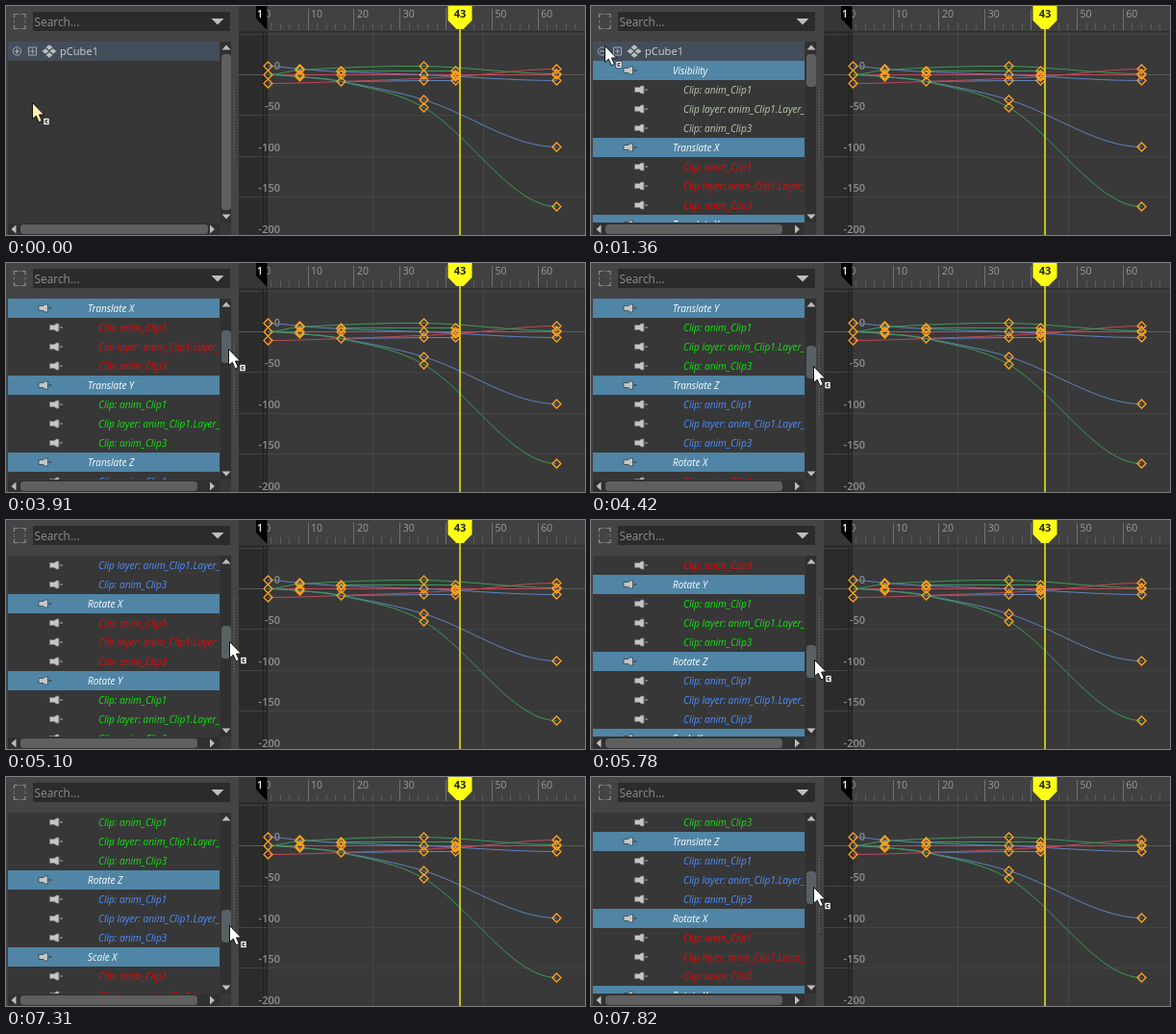
Write an HTML page that moves like this. It is 602 by 238 pixels and loops after 7.99 s.

```html
<!DOCTYPE html>
<html lang="en">
<head>
<meta charset="utf-8">
<title>Graph editor</title>
<style>
html, body { margin: 0; width: 100%; height: 100%; overflow: hidden; background: #444; }
svg { display: block; width: 602px; height: 238px; font-family: "Open Sans", "Noto Sans", sans-serif; }
text { white-space: pre; }
</style>
</head>
<body>
<svg viewBox="0 0 602 238">
  <defs>
    <clipPath id="view"><rect x="2" y="37" width="220" height="188"/></clipPath>
    <path id="horn" d="M-6.5-2.5h5l1.5-1.5h3v8h-3l-1.5-1.5h-5zM4.5-.5h2v1h-2z"/>
  </defs>
  <rect width="602" height="238" fill="#444"/>
  <g id="panel"></g>
  <g id="rows" clip-path="url(#view)"></g>
  <g id="bars"></g>
  <g id="graph"></g>
  <g id="cursor">
    <path id="arrow" d="M.5 .5V17.5L4.3 14.2 7.2 20.8 10.4 19.4 7.5 13H12.6Z" stroke="#111"/>
    <rect x="12" y="16.5" width="6" height="7" fill="#fff" stroke="#222" stroke-width=".6"/>
    <path d="M16.5 18.5h-2.5v3h2.5M14 20h2" fill="none" stroke="#222" stroke-width=".9"/>
  </g>
</svg>
<script>
const LOOP = 7990, STEP = 170, OPEN = 8, ROW = 20, TOP = 37;
const $ = id => document.getElementById(id);

const rect = (x, y, w, h, fill, rx = 0) =>
  `<rect x="${x}" y="${y}" width="${w}" height="${h}" fill="${fill}" rx="${rx}"/>`;
const line = (d, stroke, w = 1) =>
  `<path d="${d}" fill="none" stroke="${stroke}" stroke-width="${w}"/>`;
const shape = (d, fill) => `<path d="${d}" fill="${fill}"/>`;
const text = (x, y, s, fill, size, extra = "") =>
  `<text x="${x}" y="${y}" fill="${fill}" font-size="${size}" ${extra}>${s}</text>`;

// Outliner tree
const RGB = ["#e60a0a", "#0ee60e", "#4d90ff"];
const channels = [["Visibility", "#bccbb2"]];
for (const name of ["Translate", "Rotate", "Scale"])
  ["X", "Y", "Z"].forEach((axis, i) => channels.push([`${name} ${axis}`, RGB[i]]));
const clips = ["Clip: anim_Clip1", "Clip layer: anim_Clip1.Layer_", "Clip: anim_Clip3"];
const tree = [{ root: true }];
for (const [name, color] of channels)
  tree.push({ name }, ...clips.map(clip => ({ clip, color })));

function rootRow(y, open) {
  const c = y + 10;
  return rect(2, y, 220, ROW, "#434e5a") +
    `<circle cx="11.5" cy="${c}" r="4.2" fill="none" stroke="#a5a9ad"/>` +
    line(`M9 ${c}h5` + (open ? "" : `M11.5 ${c - 2.5}v5`), "#b8bcc0") +
    line(`M23.5 ${c - 4}h8v8h-8zM25 ${c}h5M27.5 ${c - 2.5}v5`, "#a5a9ad") +
    [[0, -4], [-4, 0], [4, 0], [0, 4]].map(([dx, dy]) =>
      shape(`M${45 + dx - 3.5} ${c + dy}l3.5-2.7 3.5 2.7-3.5 2.7z`, "#bcbec0")).join("") +
    text(56, c + 4, "pCube1", "#d0d2d4", 11.1);
}

function treeRow(item, y, open) {
  if (item.root) return rootRow(y, open);
  const c = y + 10, italic = 'font-style="italic"';
  const icon = (x, stroke) =>
    `<use href="#horn" x="${x}" y="${c}" fill="#c4c6c6" stroke="${stroke}" stroke-width=".8"/>`;
  return item.name
    ? rect(2, y, 220, ROW, "#5085a6") + icon(40.5, "#31424d") + text(85, c + 4, item.name, "#fff", 10, italic)
    : icon(52, "#777") + text(96, c + 4, item.clip, item.color, 10.1, italic);
}

function drawPanel() {
  let s = line("M8.5 12v-3.5h3.5M16.5 8.5h3.5v3.5M20 20v3.5h-3.5M12 23.5h-3.5v-3.5", "#8d8d8d", 1.2) +
    line("M8.5 14v4M20 14v4M13 8.5h2.5M13 23.5h2.5", "#6c6c6c") +
    rect(28, 6, 205, 20, "#2b2b2b", 1) +
    text(29.5, 20.5, "Search...", "#8f8f8f", 11.9) +
    shape("M213.5 13h13l-6.5 6.5z", "#bdbdbd") +
    rect(2, 37, 232, 201, "#373737") +
    rect(223, 37, 11, 188, "#303030") + rect(2, 226, 220, 12, "#303030");
  for (let y = 82; y < 161; y += 3) s += rect(237, y, 1, 1, "#707070") + rect(239, y + 1.5, 1, 1, "#2c2c2c");
  $("panel").innerHTML = s;
}

function drawBars(open, scroll) {
  const arrows = "M224.5 45.5h9l-4.5-5zM224.5 216.5h9l-4.5 5zM10.5 227.5v9l-5-4.5zM212 227.5v9l5-4.5z";
  $("bars").innerHTML = shape(arrows, "#bdbdbd") +
    rect(224, 50 + scroll * 4, 10, open ? 34 : 162, scroll ? "#586064" : "#5f5f5f", 3.5) +
    rect(15, 227, open ? 184 : 195, 10, "#5f5f5f", 3.5);
}

// Graph: one height per key column, null where a curve has no key
const R = "#bd4a58", G = "#3b9a58", B = "#5f82bd", _ = null;
const keyX = [272, 305, 348, 434, 467, 572];
const curves = [
  [R, 71, 71, 71, 71, 71, 71],
  [G, _, _, 67, _, 67, _],
  [B, _, _, 78, 77, 77, _],
  [R, 80, _, 78, _, 73, 65],
  [B, 62, 65, 68, 71, _, 77],
  [G, 71, 66, _, 62, _, 70],
  [B, 71, 73, 78, 97, _, 146],
  [G, 71, 73, 78, 105, _, 208]
];
const frameX = f => 271 + (f - 1) * 4.786;

// Smooth tangents at inner keys, flat at both ends
function curvePath(pts) {
  const slope = i => {
    const a = pts[i - 1], b = pts[i + 1];
    return a && b ? (b[1] - a[1]) / (b[0] - a[0]) : 0;
  };
  return pts.map(([x, y], i) => {
    if (!i) return `M${x} ${y}`;
    const [px, py] = pts[i - 1], h = (x - px) / 3;
    return `C${px + h} ${py + h * slope(i - 1)} ${x - h} ${y - h * slope(i)} ${x} ${y}`;
  }).join("");
}

function drawGraph() {
  let s = rect(242, 0, 360, 26, "#414141") + rect(242, 0, 29, 26, "#363636") +
    rect(242, 26, 360, 212, "#393939") + rect(242, 26, 29, 212, "#2b2b2b");
  for (let i = -1; i < 4; i++)
    s += line(`M242 ${Math.round(71 + i * 42.4) + .5}H602`, i ? "#444" : "#5a5a5a");
  for (const f of [24, 48]) s += line(`M${Math.round(frameX(f)) + .5} 27V238`, "#474747");
  s += line("M267.5 27V238M271.5 27V238", "#202020") + line("M242 26.5H602", "#2d2d2d");

  for (let f = 2; f < 70; f += 2) {
    const ten = f % 10 === 0;
    s += line(`M${Math.floor(frameX(f)) + .5} ${ten ? 3 : 18}V25`, ten ? "#707070" : "#5c5c5c");
  }
  for (let f = 0; f <= 60; f += 10)
    if (f !== 40) s += text(frameX(f) + 3, 12, f, "#9c9c9c", 10.5);
  for (let i = 0; i < 5; i++)
    s += text(285, 66 + i * 42.4, i ? -50 * i : "0", "#909090", 11, 'text-anchor="end" font-weight="600"');

  let marks = "";
  s += '<g transform="translate(.5 .5)">';
  for (const [color, ...ys] of curves) {
    const pts = ys.map((y, i) => [keyX[i], y]).filter(p => p[1] !== null);
    s += line(curvePath(pts), color);
    for (const [x, y] of pts) marks += `M${x} ${y - 4.5}l4.5 4.5-4.5 4.5-4.5-4.5z`;
  }
  s += "</g>";

  const now = frameX(43);
  s += line(`M${now} 20V238`, "#e4e01c", 1.6) +
    `<path transform="translate(.5 .5)" d="${marks}" fill="none" stroke="#ffa21f" stroke-width="1.3"/>` +
    shape("M260 0H271.5V25L260 13Z", "#000") + text(261, 11.5, "1", "#eee", 10.5, 'font-weight="600"') +
    shape(`M${now - 12.5} 0h25v15l-9 9h-7l-9-9z`, "#ffff14") +
    text(now, 12, "43", "#222", 11, 'text-anchor="middle" font-weight="700"');
  $("graph").innerHTML = s;
}

// Motion keys: step, pointer x, pointer y, scrolled rows, easing into the key
const linear = p => p, smooth = p => p * p * (3 - 2 * p), settle = p => 1 - (1 - p) ** 3;
const keys = [
  [0, 27, 100, 0],
  [4, 14, 41, 0, smooth],
  [13, 14, 41, 0],
  [17, 204, 75, 0, smooth],
  [19, 230, 71, 0, settle],
  [20, 230, 71, 0],
  [26, 231, 107, 9],
  [34, 232, 145, 20],
  [40, 232, 161, 24, settle],
  [42, 232, 161, 24],
  [46, 231, 114, 12, smooth]
];

function poseAt(step) {
  const i = Math.max(1, keys.findIndex(k => k[0] >= step));
  const a = keys[i - 1], b = keys[i], ease = b[4] || linear;
  const p = ease((step - a[0]) / (b[0] - a[0]));
  return [1, 2, 3].map(n => Math.round(a[n] + (b[n] - a[n]) * p));
}

let shown = -1;
function render(ms) {
  const step = Math.floor((ms % LOOP) / STEP);
  if (step === shown) return;
  shown = step;
  const open = step >= OPEN, [x, y, scroll] = poseAt(step);
  const visible = open ? tree.slice(scroll, scroll + 10) : tree.slice(0, 1);
  $("rows").innerHTML = visible.map((item, i) => treeRow(item, TOP + i * ROW, open)).join("");
  drawBars(open, scroll);
  $("cursor").setAttribute("transform", `translate(${x} ${y})`);
  $("arrow").setAttribute("fill", step ? "#fff" : "#fff0b4");
}

drawPanel();
drawGraph();
const start = performance.now();
function tick() {
  render(performance.now() - start);
  requestAnimationFrame(tick);
}
tick();
</script>
</body>
</html>
```
